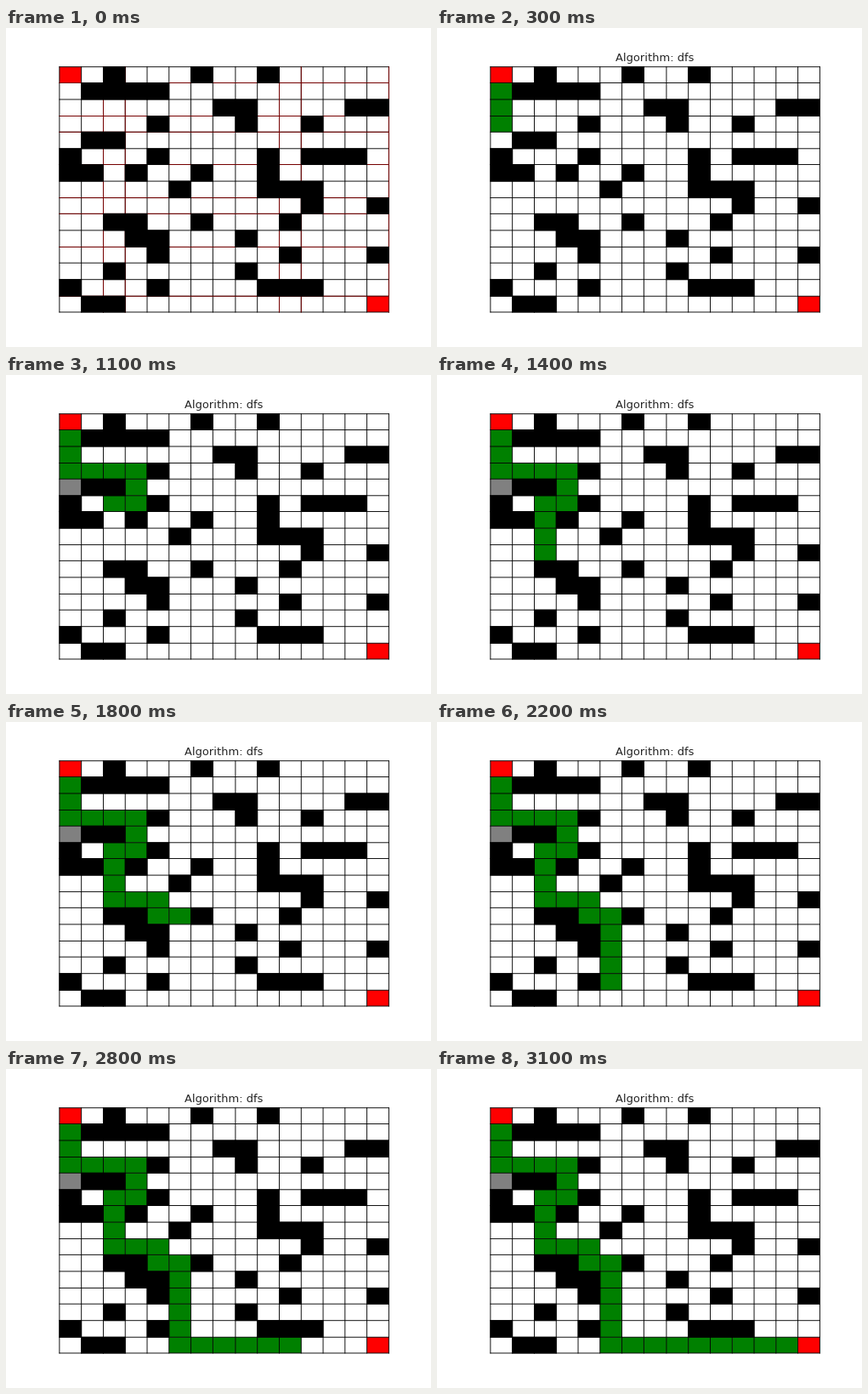
These frames come from a looping animation (500 by 375 pixels, 3400 ms). A matplotlib script:

```python
import numpy as np
import matplotlib.pyplot as plt
from matplotlib.animation import FuncAnimation
from matplotlib.collections import LineCollection
from matplotlib.patches import Rectangle

W, H, DPI = 500, 375, 78.125
N = 15
TICK, FRAMES = 100, 34

MAZE = """
..#...#..#.....
.####..........
.......##....##
....#...#..#...
.##............
#...#....#.###.
##.#..#..#.....
.....#...###...
...........#..#
..##..#...#....
...##...#......
....#.....#...#
..#.....#......
#...#....###...
.##............
""".split()

# Depth-first walk; U steps back out of the dead end.
MOVES = "DDDDU" + "RRR" + "DDL" + "DDD" + "RRDR" + "DDDDD" + "R" * 8
STEP = {"D": (1, 0), "U": (-1, 0), "L": (0, -1), "R": (0, 1)}
GREEN, GRAY, RED = "#008000", "#808080", "#ff0000"


def edges(start, end):
    """Grid lines snapped on a 640 x 480 raster, scaled to the stage."""
    raw = np.linspace(start, end, N + 1)
    return (np.floor(raw + 0.5) + 0.5) * W / 640


xs = edges(80, 576)
ys = edges(57.6, 427.2)
LINE = 0.92

fig = plt.figure(figsize=(W / DPI, H / DPI), dpi=DPI, facecolor="white")
ax = fig.add_axes([0, 0, 1, 1])
ax.set_xlim(0, W)
ax.set_ylim(H, 0)
ax.axis("off")


def add_cell(row, col, color, zorder=1, pad=0.0):
    box = Rectangle((xs[col] - pad, ys[row] - pad),
                    xs[col + 1] - xs[col] + 2 * pad,
                    ys[row + 1] - ys[row] + 2 * pad,
                    facecolor=color, linewidth=0, zorder=zorder, snap=False)
    return ax.add_patch(box)


def add_lines(segments, color, zorder):
    lines = LineCollection(segments, colors=color, linewidths=LINE * 72 / DPI,
                           capstyle="projecting", zorder=zorder)
    lines.set_snap(False)
    return ax.add_collection(lines)


cols = [[(x, ys[0]), (x, ys[-1])] for x in xs]
rows = [[(xs[0], y), (xs[-1], y)] for y in ys]
add_lines(cols + rows, "black", 2)

# Some lines are dark red before the search starts.
tinted = [cols[i] for i in (2, 3, 10, 11, 15)]
tinted += [rows[i] for i in (1, 3, 4, 6, 8, 9, 11, 14)]
tint = add_lines(tinted, "#800000", 2.5)

for r, line in enumerate(MAZE):
    for c, mark in enumerate(line):
        if mark == "#":
            add_cell(r, c, "black", 3, LINE / 2)

add_cell(0, 0, RED)
add_cell(N - 1, N - 1, RED)

title = ax.text(256.25, 38.5, "Algorithm: dfs", ha="center", va="baseline",
                family="DejaVu Sans", fontsize=12, color="#262626")


def walk(moves):
    """Return {cell: color} after the given moves."""
    cells, pos = {}, (0, 0)
    for move in moves:
        if move == "U":
            cells[pos] = GRAY
        dr, dc = STEP[move]
        pos = pos[0] + dr, pos[1] + dc
        cells[pos] = GREEN
    return cells


patches = {cell: add_cell(*cell, GREEN) for cell in walk(MOVES)}


def draw(i):
    shown = walk(MOVES[:i])
    for cell, patch in patches.items():
        patch.set_visible(cell in shown)
        patch.set_facecolor(shown.get(cell, GREEN))
    title.set_visible(i > 0)
    tint.set_visible(i == 0)
    return [title, tint, *patches.values()]


anim = FuncAnimation(fig, draw, frames=FRAMES, interval=TICK,
                     init_func=lambda: draw(0), repeat=True, repeat_delay=0)
plt.show()
```
